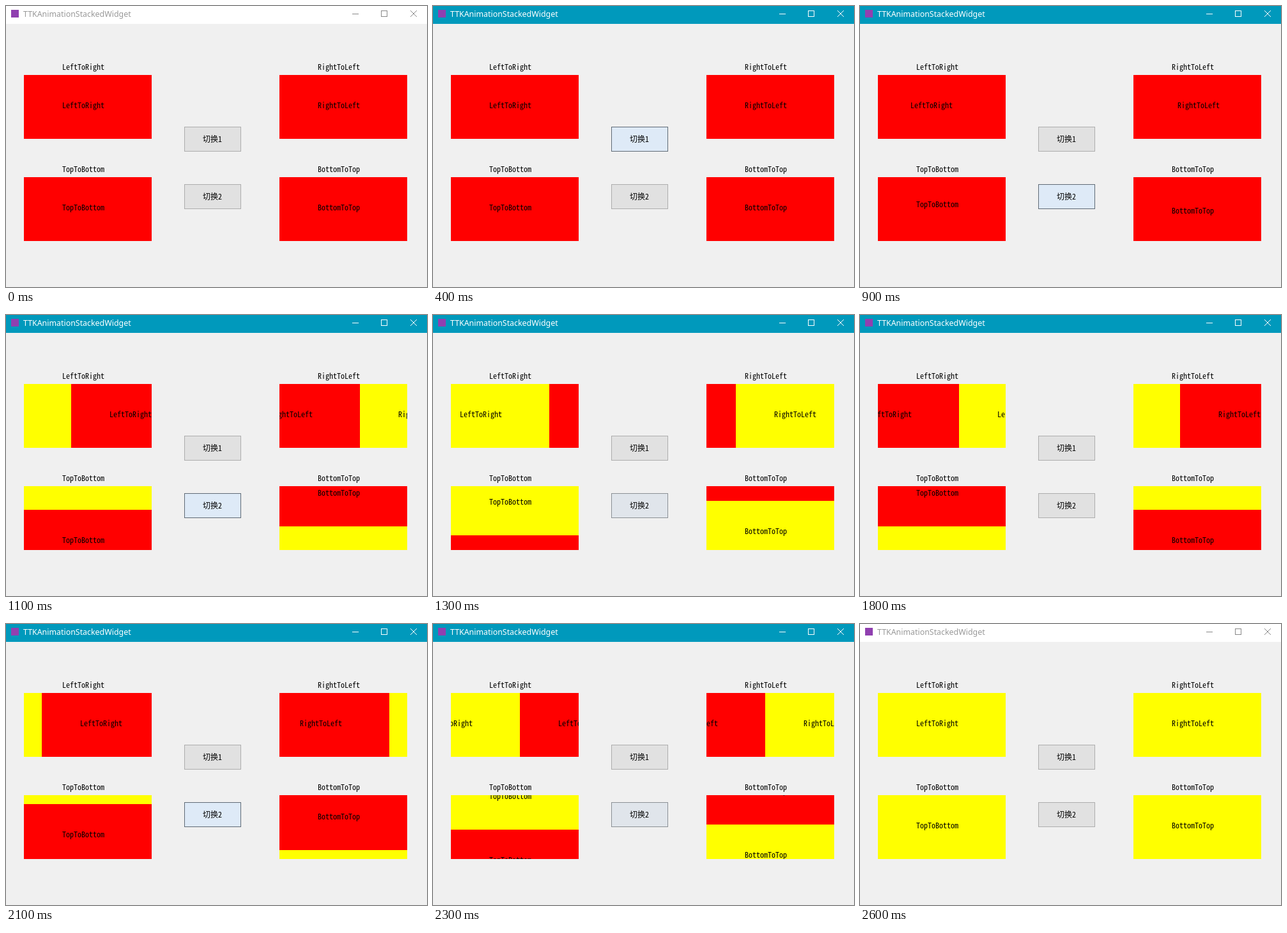
Write an HTML page that moves like this. It is 659 px wide and 440 px high and loops after 2700 ms.

```html
<!DOCTYPE html>
<html lang="zh">
<head>
<meta charset="utf-8">
<title>TTKAnimationStackedWidget</title>
<style>
html, body { margin: 0; width: 659px; height: 440px; overflow: hidden; background: #f0f0f0; }
#stage { display: block; }
text { white-space: pre; }
.mono { font: 12px "Noto Sans Mono CJK SC", "Noto Sans Mono", "Noto Sans CJK SC", monospace; }
.narrow .mono:not(.cjk) { font-size: 10px; }
#title { font: 12.4px "Noto Sans", "Open Sans", sans-serif; }
rect, #controls { shape-rendering: crispEdges; }
#controls path { fill: none; }
#close { shape-rendering: auto; }
</style>
</head>
<body>
<svg id="stage" width="659" height="440" viewBox="0 0 659 440">
  <rect id="bar" width="659" height="28"/>
  <rect x="8" y="6" width="12" height="12" fill="#9040b0"/>
  <text id="title" x="27" y="17">TTKAnimationStackedWidget</text>
  <g id="controls">
    <path d="M542 12.5h10M587.5 7.5h9v9h-9z"/>
    <path id="close" d="M633 7l10 10m0-10l-10 10"/>
  </g>
</svg>
<script>
const LOOP = 2700, STEP = 100, SLIDE = 500;
const RED = '#ff0000', YELLOW = '#ffff00';
const stage = document.getElementById('stage');
const [bar, title, controls] = ['bar', 'title', 'controls'].map(id => document.getElementById(id));

// dx, dy: direction in which pages travel
const panes = [
  { name: 'LeftToRight', x: 28, y: 108, dx: 1, dy: 0 },
  { name: 'RightToLeft', x: 428, y: 108, dx: -1, dy: 0 },
  { name: 'TopToBottom', x: 28, y: 268, dx: 0, dy: 1 },
  { name: 'BottomToTop', x: 428, y: 268, dx: 0, dy: -1 }
];
// spans: times between which the pointer's glow rises and fades
const buttons = [
  { label: '切换1', y: 189, spans: [[200, 700], [1300, 1800]] },
  { label: '切换2', y: 279, spans: [[700, 1390], [1900, 2390]] }
];
const slides = [
  { start: 422.5, from: RED, to: RED },
  { start: 915, from: RED, to: YELLOW },
  { start: 1482.5, from: YELLOW, to: RED },
  { start: 2030, from: RED, to: YELLOW }
];

const clamp = v => Math.max(0, Math.min(1, v));
const mix = (a, b, k) => `rgb(${a.map((v, i) => Math.round(v + (b[i] - v) * k))})`;

function add(markup) {
  stage.insertAdjacentHTML('beforeend', markup);
  return stage.lastElementChild;
}

for (const p of panes) {
  add(`<text class="mono" x="${p.x + 60}" y="${p.y - 8}">${p.name}</text>`);
  const page = `<g><rect width="200" height="100"/><text class="mono" x="60" y="52">${p.name}</text></g>`;
  p.pages = add(`<svg x="${p.x}" y="${p.y}" width="200" height="100" overflow="hidden">${page + page}</svg>`).children;
}
for (const b of buttons) {
  b.box = add(`<rect x="279.5" y="${b.y + .5}" width="88" height="38"/>`);
  add(`<text class="mono cjk" x="308" y="${b.y + 24}">${b.label}</text>`);
}
// Half-width Latin needs a smaller size when the CJK mono face is missing
if (stage.querySelector('.mono').getComputedTextLength() > 69) stage.classList.add('narrow');

function place(page, x, y, color) {
  page.setAttribute('transform', `translate(${x} ${y})`);
  page.firstElementChild.setAttribute('fill', color);
}

function draw(t) {
  const active = t >= 300 && t < 2600;
  bar.setAttribute('fill', active ? '#0099bc' : '#ffffff');
  title.setAttribute('fill', active ? '#ffffff' : '#999999');
  controls.setAttribute('stroke', active ? '#ffffff' : '#888888');

  const slide = slides.filter(s => s.start <= t).pop() || slides[0];
  const elapsed = Math.max(0, Math.min(SLIDE, t - slide.start));
  const across = Math.floor(elapsed / 2.5), down = Math.floor(elapsed / 5);
  for (const { pages, dx, dy } of panes) {
    place(pages[0], dx * across, dy * down, slide.from);
    place(pages[1], dx * (across - 200), dy * (down - 100), slide.to);
  }

  for (const { box, spans } of buttons) {
    const glow = Math.max(...spans.map(([a, b]) => clamp(Math.min(t - a, b - t) / 200)));
    box.setAttribute('fill', mix([225, 225, 225], [222, 234, 247], glow));
    box.setAttribute('stroke', mix([173, 173, 173], [95, 106, 117], glow));
  }
}

const origin = performance.now();
function tick() {
  const t = Math.floor((performance.now() - origin) % LOOP / STEP) * STEP;
  draw(t < 300 ? 0 : t);
  requestAnimationFrame(tick);
}
tick();
</script>
</body>
</html>
```
